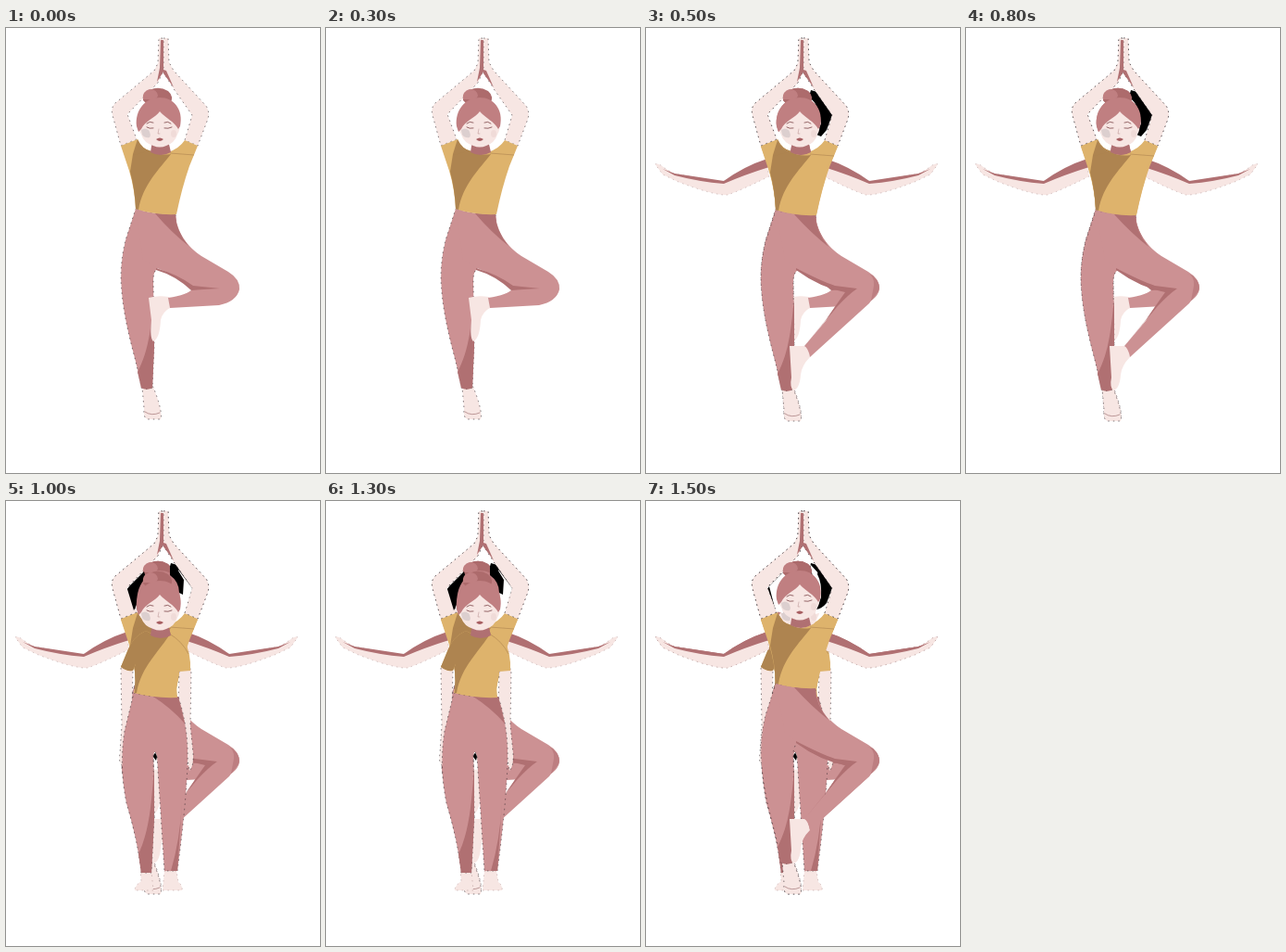
Animation, 339 px wide and 480 px high, one loop 2 s. Source, as an HTML page:

```html
<!DOCTYPE html>
<html lang="en">
<head>
<meta charset="utf-8">
<title>Yoga poses</title>
<style>
html, body { margin: 0; width: 100%; height: 100%; overflow: hidden; background: #fff; }
svg { display: block; width: 100vw; height: 100vh; }
.skin { fill: #f7e6e3; }
.cloth { fill: #cc9193; }
.shade { fill: #b07072; }
.shirt { fill: #deb36c; }
.fold { fill: #ae8450; }
.hair { fill: #c07f81; }
.bun { fill: #ad6b6c; }
.edge { stroke: #30262a; stroke-width: .6; stroke-dasharray: 1.5 4; }
.soft { stroke: #9b7778; stroke-width: .4; stroke-dasharray: 1.5 4; }
.line { fill: none; stroke: #8a5658; stroke-width: .9; stroke-linecap: round; }
.seam { fill: none; stroke: #ae8450; stroke-width: .6; }
.void { fill: #000; }
.gap { fill: #fff; }
</style>
</head>
<body>
<svg viewBox="0 0 339 480" preserveAspectRatio="none">
<defs>
  <g id="head">
    <path class="shade" d="M158 121H175L178 134Q167 140 156 134Z"/>
    <path class="bun" d="M148 78Q146 70 155 67Q165 62 175 68Q182 74 177 82H152Z"/>
    <path class="hair" d="M148 77Q147 68 155 66Q163 66 164 73Q162 79 153 77Z"/>
    <path class="skin" d="M145 103Q142 108 146 115Q149 124 159 127Q166 130 173 127Q182 124 185 115Q189 108 186 103Q179 85 166 85Q150 86 145 103Z"/>
    <path class="hair" d="M141 106C139 88 151 75 166 75C181 75 192 88 188 106L186 109C182 101 172 97 166 90C161 97 150 100 146 109L143 112Z"/>
    <path d="M146 110Q150 107 154 110Q157 115 155 118Q150 119 147 115Z" fill="#dccfcf"/>
    <ellipse cx="181" cy="114" rx="3" ry="4" fill="#f0dbd8"/>
    <path class="line" d="M152 103Q155 100 159 102M171 102Q175 100 178 103M152 107Q155 109 159 108M171 108Q175 109 179 107"/>
    <path class="line" d="M165 109L164 114H166" stroke-width=".5" opacity=".35"/>
    <path d="M162 120Q166 117 170 120Q166 124 162 120Z" fill="#a75e61"/>
  </g>
  <g id="raised">
    <path class="skin edge" d="M169 11H165L164 38L160 46L118 81Q113 86 115 94L124 127L141 120L131 93L164 59L169 48Z"/>
    <path class="skin edge" d="M170 11H175L176 37L181 46L216 84Q220 90 218 98L207 127L193 121L201 94L182 67L170 48Z"/>
    <path class="shade" d="M167 13H170L170 47L163 58L166 43Z"/>
    <path class="shade" d="M170 45L173 46L181 64L170 49Z"/>
  </g>
  <g id="top">
    <path class="shirt" d="M124 127L142 120Q147 131 157 133Q166 138 175 134Q187 130 193 121L207 127L198 149Q190 172 184 201Q160 202 140 195Q139 174 133 154Z"/>
    <path class="fold" d="M142 120L137 136L134 155Q139 174 140 195L143 196C148 168 166 152 178 136Q166 138 157 133Q147 131 142 120Z"/>
    <path class="seam" d="M137 137L154 133M177 135L203 137"/>
  </g>
  <g id="base">
    <path class="skin edge" d="M147 387H159L163 398Q169 416 167 422H153Q148 421 149 410Z"/>
    <path class="line" d="M150 414Q157 419 166 415" stroke-width=".5" opacity=".6"/>
    <path class="cloth edge" d="M140 195Q160 202 183 201L184 213L164 259Q159 262 159 272L160 343L158 388Q152 391 146 388C142 360 129 328 125 285Q122 257 129 229Z"/>
    <path class="shade" d="M160 289C157 318 155 347 142 371L146 388Q152 391 158 388L160 343Z"/>
  </g>
  <g id="arm">
    <path class="skin soft" d="M10 147Q13 145 20 151L30 157L82 166L130 145L133 160Q103 175 88 180Q74 181 35 166L18 158Z"/>
    <path class="shade" d="M18 152L31 157Q58 161 84 165Q106 149 131 141L133 150Q107 158 84 168Q58 166 31 159Z"/>
  </g>
  <g id="bent">
    <use href="#raised"/>
    <use href="#arm"/>
    <use href="#arm" transform="matrix(-1 0 0 1 325 0)"/>
    <use href="#base" y="2"/>
    <path class="skin" d="M155 343H174L177 355Q168 364 167 374Q166 389 159 391Q155 387 157 377Z"/>
    <path class="cloth" d="M140 197Q162 203 183 202C184 221 196 237 211 247L239 264Q255 274 251 283L241 297L177 355Q175 345 171 343L194 316L215 284Q199 283 163 260L150 250Z"/>
    <path class="shade" d="M160 201L183 202Q183 219 197 236Q178 221 160 201Z"/>
    <path class="shade" d="M162 259Q189 273 204 278L228 281Q219 287 206 301L171 343L194 315L215 285Q188 280 162 261Z"/>
    <path class="shade" d="M239 265Q247 267 246 278L243 294L251 284Q254 275 245 267Z" opacity=".55"/>
    <use href="#top" y="1"/>
    <use href="#head"/>
  </g>
</defs>

<g id="tree">
  <use href="#raised"/>
  <use href="#base"/>
  <path class="skin" d="M154 291Q164 288 176 290L177 302Q169 306 167 315Q166 335 159 338Q155 335 157 315Z"/>
  <path class="cloth" d="M140 195Q160 202 183 201C184 220 196 236 211 246L240 263Q253 271 252 282Q249 295 230 299L177 302L175 291Q196 288 202 281Q183 266 163 259L148 250Z"/>
  <path class="shade" d="M161 200L183 201Q183 218 197 235Q178 220 161 200Z"/>
  <path class="shade" d="M162 259Q186 266 202 278L231 281Q211 282 200 283Q183 267 162 261Z"/>
  <use href="#top"/>
  <use href="#head"/>
</g>

<g id="reach">
  <path class="void" d="M178 67L185 69L194 80L201 94L195 110L189 117L184 115L189 103Q188 84 176 74Z"/>
  <use href="#bent"/>
</g>

<g id="stand">
  <path class="gap" d="M186 74L201 94L193 119L181 129L188 110Z"/>
  <path class="void" d="M133 92L149 76L151 83Q141 92 141 112L138 118L131 95Z"/>
  <path class="void" d="M177 70L184 72L192 85L191 101L187 99Q187 87 177 80Z"/>
  <path class="skin edge" d="M124 178L137 181L136 229L128 265L127 286Q121 284 123 272L125 242Z"/>
  <path class="skin edge" d="M187 182L200 181L199 242L202 272Q203 286 198 291L194 267L186 224Z"/>
  <path class="skin soft" d="M145 399H157L159 420H139Q139 415 146 410Z"/>
  <path class="skin soft" d="M171 399H184L186 411Q191 415 190 420H169Z"/>
  <path class="cloth edge" d="M138 207Q160 213 186 211Q195 239 196 266Q197 308 185 399H171L163 275Q160 266 159 276L160 342L157 401H146Q142 365 130 326Q122 285 128 248Z"/>
  <path class="void" d="M159 276Q161 268 163 276L162 280Z"/>
  <path class="shade" d="M160 286C157 327 155 355 143 381L146 401H157L160 342Z"/>
  <path class="shade" d="M190 325Q188 365 178 399H185Z"/>
  <path class="shade" d="M159 211L186 211L193 240Q178 223 159 211Z"/>
  <path class="shirt" d="M151 140Q137 146 131 162L124 179Q130 184 137 183L140 176Q141 193 138 207Q160 213 185 212Q183 196 187 184L199 183Q200 164 192 149L180 138Q166 149 151 140Z"/>
  <path class="fold" d="M151 140Q137 146 131 162L124 179Q130 184 137 183L140 176L139 207H141C146 178 166 162 178 142Q164 148 151 140Z"/>
  <path class="seam" d="M176 143Q190 151 197 165"/>
  <use href="#head" y="11"/>
</g>

<g id="again">
  <path class="gap" d="M133 92L150 75L152 82L146 105L148 121L140 119Z"/>
  <path class="gap" d="M177 68L201 94L193 119L183 122L184 100Z"/>
  <path class="void" d="M187 70L194 80L201 94L195 110Q190 116 184 117L189 104Q190 88 185 79Z"/>
  <use href="#bent"/>
</g>
</svg>
<script>
const loop = 2000;
const starts = { reach: 500, stand: 1000, again: 1500 };

// Each pose stays on top of the earlier ones until the loop restarts.
for (const [id, start] of Object.entries(starts)) {
  const anim = document.getElementById(id).animate([
    { visibility: 'hidden', offset: 0, easing: 'step-end' },
    { visibility: 'visible', offset: start / loop, easing: 'step-end' },
    { visibility: 'visible', offset: 1 }
  ], { duration: loop, iterations: Infinity });
  anim.startTime = 0;
}
</script>
</body>
</html>
```
